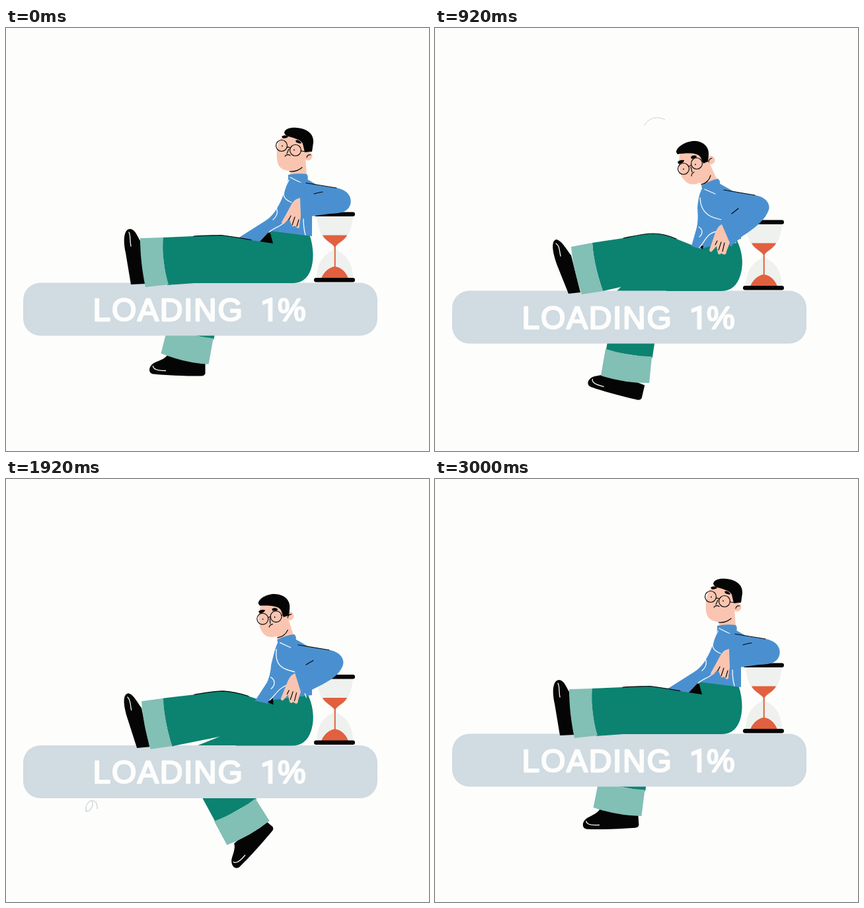
An HTML page that plays this animation: 640 by 640 pixels, repeating every 3080 ms.

```html
<!DOCTYPE html>
<html lang="en">
<head>
<meta charset="utf-8">
<title>Loading</title>
<style>
  html, body { margin: 0; width: 100%; height: 100%; overflow: hidden; background: #fdfdfc; }
  svg { display: block; width: 100%; height: 100%; }
  path { stroke-linecap: round; stroke-linejoin: round; fill: none; }
  .green { fill: #0c8270; } .cuff { fill: #82bfb4; } .blue { fill: #4a90d0; }
  .skin { fill: #fac5b0; } .black { fill: #050505; } .glass { fill: #eef1ed; }
  .sand { fill: #e1603f; } .pale { fill: #d0dbe2; }
  .ink { stroke: #050505; stroke-width: 1.15; }
  .light { stroke: #fdfdfc; stroke-width: 1.3; }
  .thread { stroke: #c6d2d3; stroke-width: 1.2; }
  text { font: 48px "Liberation Sans", Arial, sans-serif; letter-spacing: 1.7px;
         fill: #fdfdfc; stroke: #fdfdfc; stroke-width: 2.5; stroke-linejoin: round; }
  .one { font-family: Roboto, sans-serif; }
</style>
</head>
<body>
<svg viewBox="0 0 640 640">
  <g id="sparkles"></g>
  <g id="scene">
    <path class="glass" d="M470 284H525C524 300 519 314 511 321C505 327 500 328 500 333C500 338 506 338 513 345C521 353 525 366 525 379H470C470 366 474 353 482 345C489 338 495 338 495 333C495 328 490 327 484 321C476 314 471 300 470 284Z"/>
    <path class="sand" d="M479 313.500H516C513 321 501 326 498.700 331V361C506 362 514 368 518 379H477C481 368 490 362 496.700 361V331C494 326 482 321 479 313.500Z"/>
    <rect class="black" x="466" y="278.500" width="62" height="6.500" rx="3.200"/>
    <rect class="black" x="466" y="378" width="62" height="6.500" rx="3.200"/>
    <path class="green" id="thigh"/>
    <g id="foot">
      <path class="black" d="M31 2V22Q30 26 25 26C0 26-30 25-48 23C-57 21-54 10-46 6C-37 2-30 0-26-6Z"/>
      <path class="light" d="M-48 11C-48 17-38 18-29 18"/>
    </g>
    <g id="shin">
      <path class="green" d="M-35-38L-34-85H36L36-38Z"/>
      <path class="cuff" d="M-36-41Q0-35 35-40L37 0Q0 6-37 0Z"/>
    </g>
    <rect class="pale" x="26" y="385.500" width="536" height="80" rx="26"/>
    <text x="131.500" y="442.500">LOADING</text>
    <text class="one" x="385" y="442.500">1</text>
    <text x="411" y="442.500">%</text>
    <g id="man"></g>
  </g>
</svg>
<script>
const $ = id => document.getElementById(id);

// Key moments in ticks (12 per second) of a 37-tick loop.
const KEYS = [0, 5, 11, 18, 23, 31, 36], LOOP = 37, LOOP_MS = 3080;

// Smooth periodic curve through one value per key moment, without overshoot.
function track(...values) {
  const n = KEYS.length, wrap = i => (i + n) % n;
  const span = i => (KEYS[wrap(i + 1)] - KEYS[wrap(i)] + LOOP) % LOOP;
  const slope = i => (values[wrap(i + 1)] - values[wrap(i)]) / span(i);
  const tangent = i => {
    const a = slope(i - 1), b = slope(i);
    return a * b > 0 ? 2 * a * b / (a + b) : 0;
  };
  return tick => {
    const i = KEYS.filter(k => k <= tick).length - 1, h = span(i), u = (tick - KEYS[i]) / h;
    const s = u * u * (3 - 2 * u);
    return values[i] * (1 - s) + values[wrap(i + 1)] * s
      + h * u * (1 - u) * (tangent(i) * (1 - u) - tangent(i + 1) * u);
  };
}

const bob = track(0, 2, 12, 20, 17.5, 5, 0);
const lean = track(0, .85, 1, 1, .7, 0, 0);
const ankleX = track(270.5, 260, 287.5, 351.5, 366.5, 321, 276);
const ankleY = track(500.5, 501, 519.5, 528, 518, 514, 503.5);
const shinAngle = track(13, 19.4, 8.6, -20.6, -29.6, -10.7, 10);
const footAngle = track(0, 13, 13, -29, -50, -38, -4);
const thighTop = track(285, 291, 297, 342, 344, 320, 285);
const thighLow = track(265, 265, 275, 294, 289, 280, 265);

const circle = (x, y, r) => `M${x - r} ${y}a${r} ${r} 0 1 0 ${2 * r} 0a${r} ${r} 0 1 0 ${-2 * r} 0`;

// Each part: class, outline leaning on the hourglass, outline sitting upright.
const parts = [
  ['black', 'M189 388L181 340C176 316 180 304 188 304C196 305 199 316 203 322L211 387Z',
            'M202 390L186 350C176 324 176 309 184 308C192 310 198 322 206 332L220 388Z'],
  ['light', 'M186 309C189 315 187 322 189 330', 'M183 314C189 318 188 325 190 333'],
  ['green', 'M236 317L284 315C300 314 312 314 325 313C340 315 355 318 371 320L390 323L400 306L459 312C466 332 466 352 461 366C455 381 446 386 432 386L345 386L285 386L244 389C240 365 236 340 236 317Z',
            'M238 313L285 306C300 303 315 299 330 299C345 299 356 303 365 307L390 317L404 319L455 306C466 326 467 346 462 362C457 378 448 386 432 386L350 386L342 366L254 386C246 362 240 340 238 313Z'],
  ['cuff', 'M203 318L238 317C236 340 239 365 246 388L211 392C206 368 203 343 203 318Z',
           'M206 319L238 313C240 338 246 364 254 386L222 391C214 367 208 343 206 319Z'],
  ['skin', 'M430 208L453 196L455 224L430 224Z', 'M398 216L416 194L427 218L405 230Z'],
  ['blue', 'M427 229C422 245 419 258 411 271C406 280 400 287 392 292L351 318L384 323L399 307L463 315L463 280L475 240L456 229Z',
           'M404 231C399 240 398 250 397 260C398 272 398 280 396 290L388 318L401 322L406 321L463 307L463 290L460 240L430 223Z'],
  ['blue', 'M427 222Q441 219 455 221Q458 225 456 230L427 231Z', 'M403 227Q415 219 428 216Q432 219 431 224L405 233Z'],
  ['black', 'M384 323L399 307L404 326Z', 'M401 319L406 317L405 323Z'],
  ['ink', 'M284 315C300 314 312 314 325 313.5C340 315 355 318 371 320.5',
          'M285 306C300 303 315 299 330 299C345 299 356 303 365 307'],
  ['light', 'M428 230C416 252 418 258 432 264', 'M401 245C402 270 418 276 440 279'],
  ['light', 'M404 267C412 272 413 282 404 290', 'M399 289C406 293 405 300 400 304'],
  ['light', 'M398 309C408 300 420 300 421 290', 'M400 320C408 312 412 296 428 296'],
  ['light', 'M430 226L446 234', 'M408 232L424 239'],
  ['light', 'M450 289Q450 302 453 313', 'M452 306Q452 309 455 313'],
  ['blue', 'M440 233L500 242C517 245 524 256 521 267C517 279 505 281 490 281L446 287L445 256Z',
           'M428 231L484 241C499 243 508 253 505 263C500 278 484 291 465 303L447 319L434 285Z'],
  ['skin', 'M445 257C436 259 433 264 428 274L417 294Q418 298 421 296L428 288L432 298Q434 302 437 299L441 303Q445 303 444 298L446 285Z',
           'M434 285C428 288 425 294 422 304L415 324Q416 328 419 326L426 318L428 329Q430 332 433 329L438 331Q441 330 441 326L446 313Z'],
  ['ink', 'M431 284L428 290M437 286L433 298M443 290L440 300', 'M427 310L424 316M433 312L429 324M438 313L435 326'],
  ['ink', 'M454 234.5L500 242', 'M437 233L484 241'],
  ['ink', 'M466 251Q472 249 479 248', 'M449 269Q454 265 459 261'],
  ['skin', 'M423 160C409 168 408 192 411 204C414 216 430 220 446 211L455 196L452 170Z',
           'M371 178C366 196 371 212 378 219C386 228 400 226 410 214L416 196L404 172Z'],
  ['skin', circle(457, 194, 6.5), circle(417, 188, 6.5)],
  ['ink', 'M455 196Q456 191 461 192', 'M414 191Q414 186 419 185'],
  ['ink', 'M429 217Q440 218 448 211', 'M403 225Q414 222 417 211'],
  ['black', 'M421 159C421 152 432 150 440 151C455 152 466 160 465 173L463 187L452 188L449 175C447 169 434 166 424 163Z',
            'M365 176C365 168 380 159 392 159C405 159 415 167 414 180L413 190L406 193L402 184C398 176 381 177 367 179Z'],
  ['black', 'M417 164Q421 161 427 164Q426 167 419 167Z', 'M367 191Q370 187 377 188Q377 192 369 194Z'],
  ['black', 'M438 170Q443 168 447 174Q446 176 439 173Z', 'M387 183Q391 179 396 182Q396 185 388 186Z'],
  ['ink', circle(417, 178, 8.5), circle(376, 201, 8.5)],
  ['ink', circle(438, 185, 8.5), circle(396, 193, 8.5)],
  ['ink', 'M425 181Q428 179 430 182M446 186L454 187', 'M384 198Q386 195 388 196M404 190L412 187'],
  ['black', circle(418, 178.5, .9), circle(376, 201.5, .9)],
  ['black', circle(436, 184.5, .9), circle(394, 194.5, .9)],
  ['ink', 'M428 183L425 190M422 194Q426 190 430 193', 'M387 198L389 206M388 212Q388 208 392 206'],
];

// Each sparkle swells and shrinks between two ticks.
const sparkles = [
  ['pale', 3, 9, 599, 407, 45, 'M0 14C-16 3-12-11-6-11Q-1-10 0-2Q1-10 6-11C12-11 16 3 0 14Z'],
  ['thread', 9, 16, 332, 148, 0, 'M-19-1C-11-17 7-19 20-12'],
  ['thread', 21.5, 25, 129, 495, 0, 'M-8 8C-11-3 1-12 2-7C4 2-7 14-8 5M2-9C9-7 10 0 9 4'],
  ['pale', 28.5, 34, 132, 272, 0, 'M-11-7Q-1-4 9-14Q3-1 13 8Q1 4-8 14Q-4 1-11-7Z'],
];

function addPath(parent, className, d = '') {
  const path = document.createElementNS('http://www.w3.org/2000/svg', 'path');
  path.setAttribute('class', className);
  path.setAttribute('d', d);
  return parent.appendChild(path);
}

const NUMBER = /-?[\d.]+/g;
const body = parts.map(([className, from, to]) => {
  const ends = to.match(NUMBER);
  const path = addPath($('man'), className);
  return amount => {
    let k = 0;
    path.setAttribute('d', from.replace(NUMBER, n => +(+n + (ends[k++] - n) * amount).toFixed(2)));
  };
});
const glints = sparkles.map(([className, start, end, x, y, angle, d]) => {
  const path = addPath($('sparkles'), className, d);
  return tick => {
    const u = (tick - start) / (end - start), visible = u > 0 && u < 1;
    path.setAttribute('visibility', visible ? 'visible' : 'hidden');
    if (visible) path.setAttribute('transform', `translate(${x} ${y}) rotate(${angle}) scale(${Math.sin(Math.PI * u)})`);
  };
});

function draw(tick) {
  const joint = `translate(${ankleX(tick)} ${ankleY(tick)})`;
  $('scene').setAttribute('transform', `translate(0 ${bob(tick)})`);
  $('shin').setAttribute('transform', `${joint} rotate(${shinAngle(tick)})`);
  $('foot').setAttribute('transform', `${joint} rotate(${footAngle(tick)})`);
  $('thigh').setAttribute('d', `M${thighTop(tick)} 364L${thighLow(tick)} 386V420H432V364Z`);
  body.forEach(pose => pose(lean(tick)));
  glints.forEach(glint => glint(tick));
}

const startTime = performance.now();
function animate() {
  const ms = (performance.now() - startTime) % LOOP_MS;
  draw(Math.min(LOOP - 1, Math.floor((ms + 5) * 12 / 1000)));
  requestAnimationFrame(animate);
}
animate();
</script>
</body>
</html>
```
